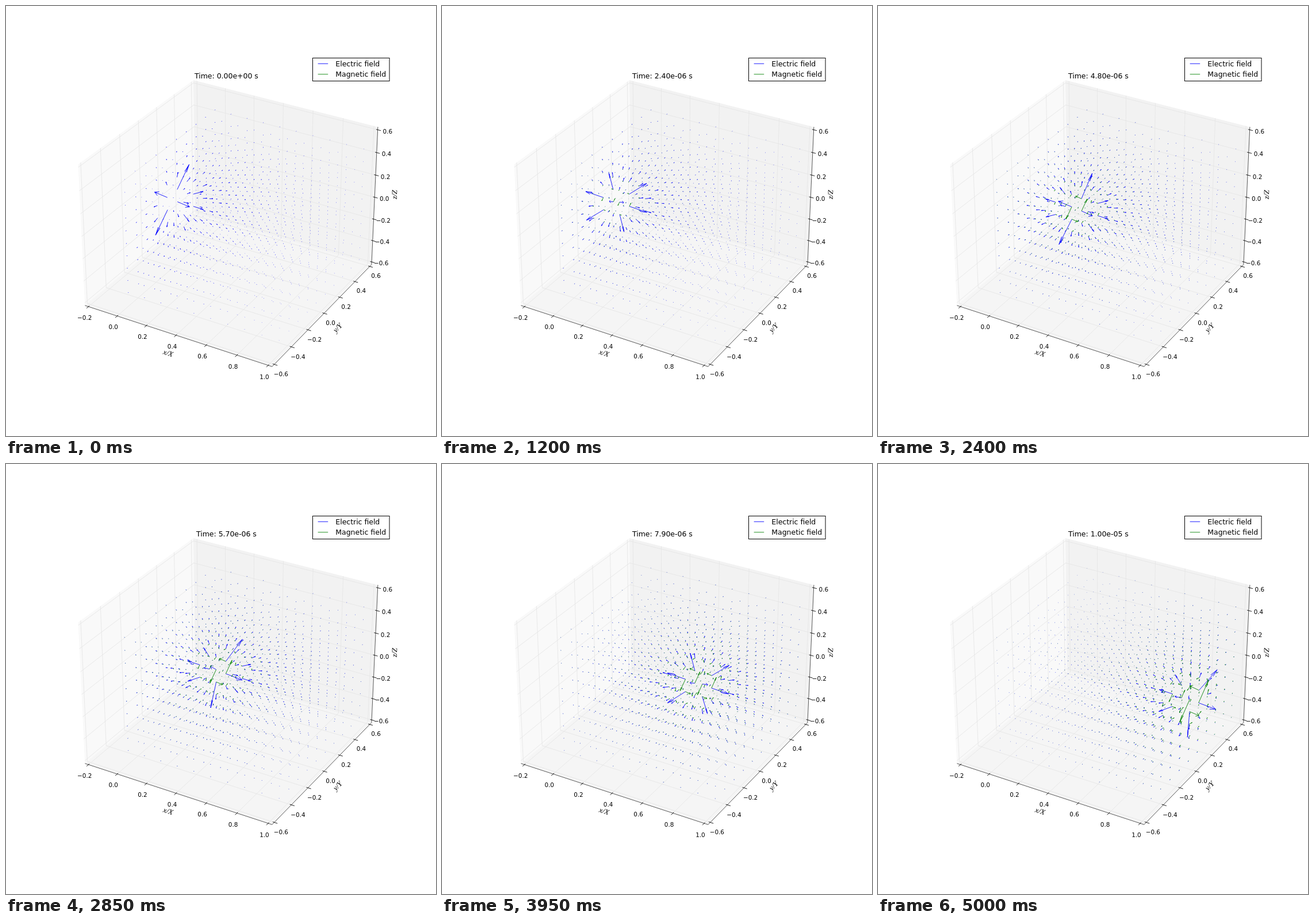
An HTML page with a canvas that plays this animation: 748 px wide and 748 px high, repeating every 5050 ms.

```html
<!DOCTYPE html>
<html lang="en">
<head>
<meta charset="utf-8">
<title>Field of an accelerating charge</title>
<style>
  html, body { margin: 0; width: 100%; height: 100%; overflow: hidden; background: #fff; }
  canvas { display: block; }
</style>
</head>
<body>
<canvas id="stage" width="748" height="748"></canvas>
<script>
const ctx = document.getElementById('stage').getContext('2d');
const FRAME_MS = 50, FRAMES = 101;
const POINT = 748 / 864;              // one typographic point in pixels
const BLUE = '#0000ff', GREEN = '#008000';
const SANS = '"DejaVu Sans", sans-serif';
const LARGE = 14.4 * POINT, MEDIUM = 12 * POINT;

// Box limits: the drawn cube is slightly larger than the tick range.
const LO = [-0.225, -0.625, -0.625], HI = [1.025, 0.625, 0.625];
const TICKS = [-0.6, -0.4, -0.2, 0, 0.2, 0.4, 0.6];

// Perspective view from azimuth -60 deg, elevation 30 deg, distance 10.
const S3 = Math.sqrt(3);
function project([x, y, z]) {
  const px = (x - 0.4) / 1.05, py = y / 1.05, pz = z / 1.4;
  const depth = 10 - (px * S3 / 4 - py * 0.75 + pz / 2);
  const right = px * S3 / 2 + py / 2;
  const up = -px / 4 + py * S3 / 4 + pz * S3 / 2;
  const scale = 3133.5 / depth;
  return [391.2 + right * scale, 366.2 - up * scale];
}

function line(a, b) {
  ctx.beginPath();
  ctx.moveTo(...project(a));
  ctx.lineTo(...project(b));
  ctx.stroke();
}

function pen(color, points) {
  ctx.strokeStyle = color;
  ctx.lineWidth = points * POINT;
}

function text(str, x, y, size, align = 'center') {
  ctx.font = `${size}px ${SANS}`;
  ctx.textAlign = align;
  ctx.fillText(str, x, y);
}

function pane(color, ...corners) {
  ctx.fillStyle = color;
  ctx.beginPath();
  corners.forEach(c => ctx.lineTo(...project(c)));
  ctx.fill();
}

function axisLabel(str, x, y, degrees) {
  ctx.save();
  ctx.translate(x, y);
  ctx.rotate(degrees * Math.PI / 180);
  ctx.font = 'italic 13px "Liberation Serif", serif';
  ctx.textAlign = 'center';
  ctx.fillText(str, 0, 4);
  ctx.restore();
}

function drawBox() {
  const [x0, y0, z0] = LO, [x1, y1, z1] = HI;
  pane('#f9f9f9', [x0, y0, z0], [x0, y1, z0], [x0, y1, z1], [x0, y0, z1]);
  pane('#f2f2f2', [x0, y1, z0], [x1, y1, z0], [x1, y1, z1], [x0, y1, z1]);
  pane('#f5f5f5', [x0, y0, z0], [x1, y0, z0], [x1, y1, z0], [x0, y1, z0]);

  pen('#e6e6e6', 1);
  for (const t of TICKS) {
    const x = t + 0.4;
    line([x, y0, z0], [x, y1, z0]); line([x, y1, z0], [x, y1, z1]);
    line([x0, t, z0], [x1, t, z0]); line([x0, t, z0], [x0, t, z1]);
    line([x0, y0, t], [x0, y1, t]); line([x0, y1, t], [x1, y1, t]);
  }

  pen('#000', 0.75);
  line([x0, y0, z0], [x1, y0, z0]);
  line([x1, y0, z0], [x1, y1, z0]);
  line([x1, y1, z0], [x1, y1, z1]);

  pen('#000', 1);
  ctx.fillStyle = '#000';
  const out = 0.02, inward = 0.01, gap = 0.043;
  const label = (value, at) => {
    const [x, y] = project(at);
    text(value.toFixed(1).replace('-', '\u2212'), x, y + 8.6, MEDIUM);
  };
  for (const t of TICKS) {
    const x = t + 0.4;
    line([x, y0 - out, z0], [x, y0 + inward, z0]);
    label(x, [x, y0 - gap, z0 - gap]);
    line([x1 + out, t, z0], [x1 - inward, t, z0]);
    label(t, [x1 + gap, t, z0 - gap]);
    line([x1 + out, y1, t], [x1 - inward, y1, t]);
    label(t, [x1 + gap, y1 + gap, t]);
  }
  axisLabel('x/X', 282, 604, 18);
  axisLabel('y/Y', 577, 560, -45);
  axisLabel('z/Z', 676, 328, -87.4);
}

function drawLegend() {
  ctx.fillStyle = '#fff';
  ctx.fillRect(533.5, 90.5, 133.5, 40);
  ctx.lineWidth = 1;
  ctx.strokeStyle = '#000';
  ctx.strokeRect(533.5, 90.5, 133.5, 40);
  [['Electric field', BLUE], ['Magnetic field', GREEN]].forEach(([name, color], i) => {
    ctx.fillStyle = '#000';
    text(name, 573.3, 105 + 18.2 * i, LARGE, 'left');
    pen(color, 1);
    ctx.beginPath();
    ctx.moveTo(542.6, 100.4 + 18.3 * i);
    ctx.lineTo(560.2, 100.4 + 18.3 * i);
    ctx.stroke();
  });
}

// Shaft plus two head strokes, each turned 15 deg about a horizontal axis.
const COS = Math.cos(Math.PI / 12), SIN = Math.sin(Math.PI / 12);
function arrow(from, v) {
  const [vx, vy, vz] = v;
  const tip = from.map((c, i) => c + v[i]);
  const flat = Math.hypot(vx, vy);
  const [ax, ay] = flat > 0 ? [vy / flat, -vx / flat] : [0, 1];
  const along = (ax * vx + ay * vy) * (1 - COS);
  line(from, tip);
  for (const s of [SIN, -SIN]) {
    const head = [
      COS * vx + ax * along + s * ay * vz,
      COS * vy + ay * along - s * ax * vz,
      COS * vz + s * (ax * vy - ay * vx)
    ];
    line(tip, tip.map((c, i) => c - 0.3 * head[i]));
  }
}

const grid = [];
for (let i = 0; i < 10; i++)
  for (let j = 0; j < 10; j++)
    for (let k = 0; k < 10; k++)
      grid.push([i / 9, j / 9 - 0.5, k / 9 - 0.5]);

// The charge starts at rest and accelerates evenly along x.
function drawFields(t) {
  const charge = 0.976 * t * t;
  const electric = grid.map(([x, y, z]) => {
    const dx = x - charge;
    const k = 0.0012 / Math.hypot(dx, y, z) ** 3;
    return [k * dx, k * y, k * z];
  });
  pen(BLUE, 1);
  grid.forEach((p, i) => arrow(p, electric[i]));
  if (t === 0) return;
  pen(GREEN, 1);
  grid.forEach((p, i) => {
    const [, ey, ez] = electric[i];
    arrow(p, [0, -t * ez, t * ey]);
  });
}

function timeLabel(index) {
  const [mantissa, exponent] = (index / 1e7).toExponential(2).split('e');
  return `Time: ${mantissa}e${exponent[0]}${exponent.slice(1).padStart(2, '0')} s`;
}

function draw(index) {
  ctx.fillStyle = '#fff';
  ctx.fillRect(0, 0, 748, 748);
  drawBox();
  drawFields(index / 100);
  drawLegend();
  ctx.fillStyle = '#000';
  text(timeLabel(index), 383.4, 126, LARGE);
}

let shown = -1;
const start = performance.now();
function tick() {
  const index = Math.floor((performance.now() - start) / FRAME_MS) % FRAMES;
  if (index !== shown) draw(shown = index);
  requestAnimationFrame(tick);
}
tick();
</script>
</body>
</html>
```
